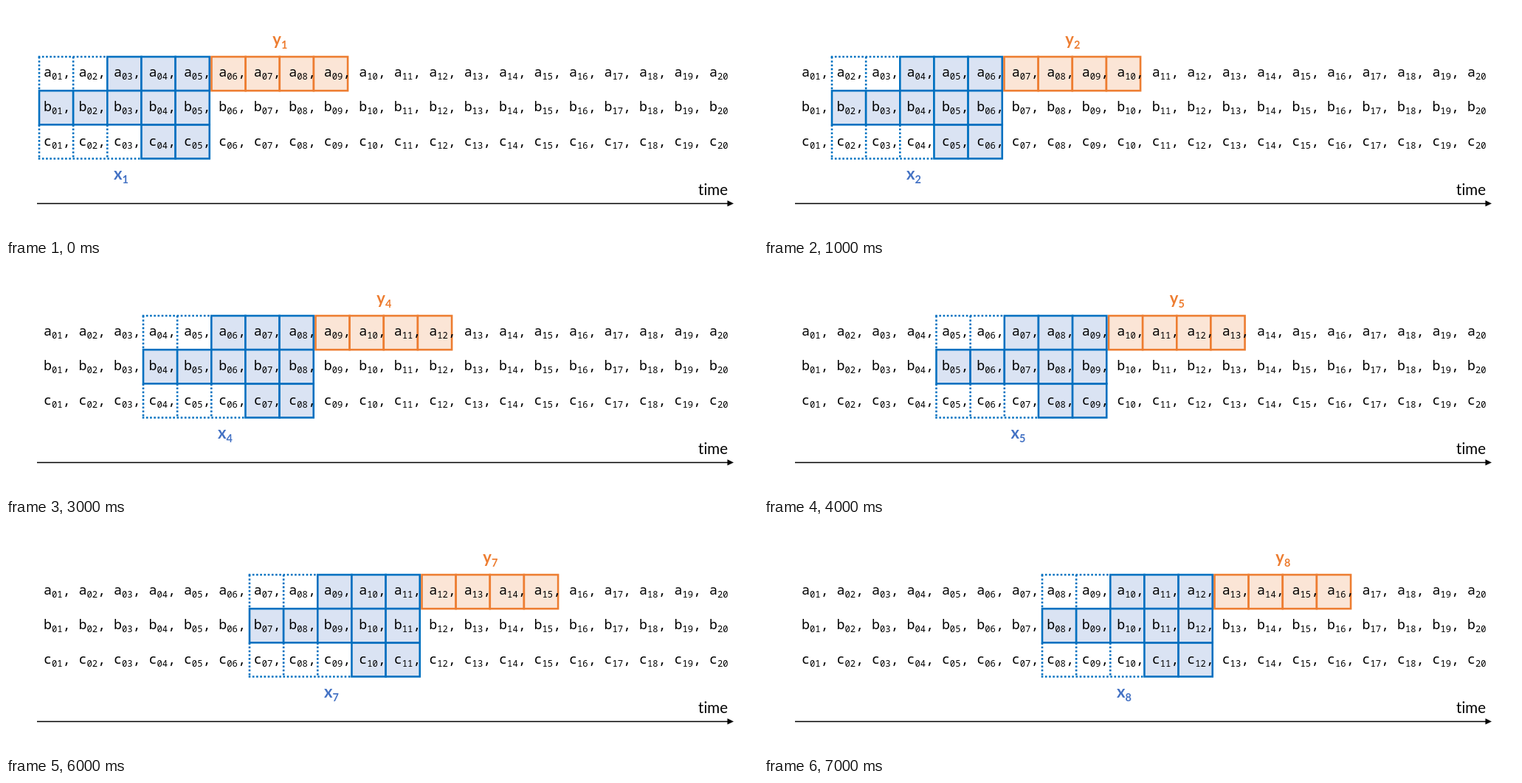
An HTML page that plays this animation: 1019 by 314 pixels, repeating every 8000 ms.

```html
<!DOCTYPE html>
<html lang="en">
<head>
<meta charset="utf-8">
<title>Sliding window</title>
<style>
  html, body { margin: 0; width: 100%; height: 100%; overflow: hidden; background: #fff; }
  svg { display: block; width: 100%; height: 100%; }
  .series { font: 18.3px "Noto Sans Mono", monospace; }
  .series .sub { font-size: 12.2px; font-weight: 500; }
  .label { font: bold 22px Lato, sans-serif; }
  .label .sub { font-size: 14.5px; }
  .time { font: 20.5px Lato, sans-serif; font-variant-ligatures: none; text-anchor: end; }
  .input { fill: #dae3f3; stroke: #0070c0; stroke-width: 2.6; }
  .output { fill: #fbe5d6; stroke: #ed7d31; stroke-width: 2.6; }
  .dots { fill: none; stroke: #0070c0; stroke-width: 2.6; stroke-dasharray: 2.6 2.6; }
</style>
</head>
<body>
<svg viewBox="0 0 1019 314">
  <g id="window"></g>
  <g id="series" class="series"></g>
  <text class="time" x="978" y="257">time</text>
  <path d="M42 268.4H980" stroke="#000" stroke-width="1.5"/>
  <path d="M977.5 264.2L986 268.4L977.5 272.6Z"/>
</svg>
<script>
const CELL = 46.15, LEFT = 45, TOP = 69, STEP_MS = 1000;
const offsets = [0, 47, 94, 141, 188.5, 237, 285, 332];
const frame = document.getElementById("window");

const cells = (kind, left, row, from, to) => {
  let out = "";
  for (let i = from; i < to; i++)
    out += `<rect class="${kind}" x="${left + i * CELL}" y="${TOP + row * CELL}" width="${CELL}" height="${CELL}"/>`;
  return out;
};

const dots = d => `<path class="dots" d="${d}"/>`;

// Empty cells: one long edge at y, plus vertical dividers down the row.
const dotted = (row, count, y) => {
  let out = dots(`M${LEFT - 1.3} ${y}h${count * CELL}`);
  for (let i = 0; i < count; i++)
    out += dots(`M${LEFT + i * CELL} ${TOP + row * CELL}v${CELL}`);
  return out;
};

const label = (name, x, y, color) =>
  `<text class="label" x="${x}" y="${y}" fill="${color}">${name}<tspan class="sub index" dy="4.9"></tspan></text>`;

frame.innerHTML =
  dotted(0, 2, TOP) + dotted(2, 3, TOP + 3 * CELL) +
  cells("output", 278.5, 0, 0, 4) +
  cells("input", LEFT, 0, 2, 5) +
  cells("input", LEFT, 2, 3, 5) +
  cells("input", LEFT, 1, 0, 5) +
  label("y", 361.3, 53.3, "#ed7d31") + label("x", 146, 236, "#4472c4");

let series = "";
["a", "b", "c"].forEach((name, row) => {
  for (let i = 0; i < 20; i++) {
    const index = String(i + 1).padStart(2, "0");
    const comma = i < 19 ? '<tspan dy="-3.6">,</tspan>' : "";
    series += `<text x="${51 + i * 47.47}" y="${96.2 + row * 46.9}">${name}<tspan class="sub" dy="3.6">${index}</tspan>${comma}</text>`;
  }
});
document.getElementById("series").innerHTML = series;

const indices = frame.querySelectorAll(".index");
let shown = -1;
function draw(now) {
  const step = Math.floor(now / STEP_MS) % offsets.length;
  if (step !== shown) {
    shown = step;
    frame.setAttribute("transform", `translate(${offsets[step]} 0)`);
    indices.forEach(el => el.textContent = step + 1);
  }
  requestAnimationFrame(draw);
}
draw(performance.now());
</script>
</body>
</html>
```
